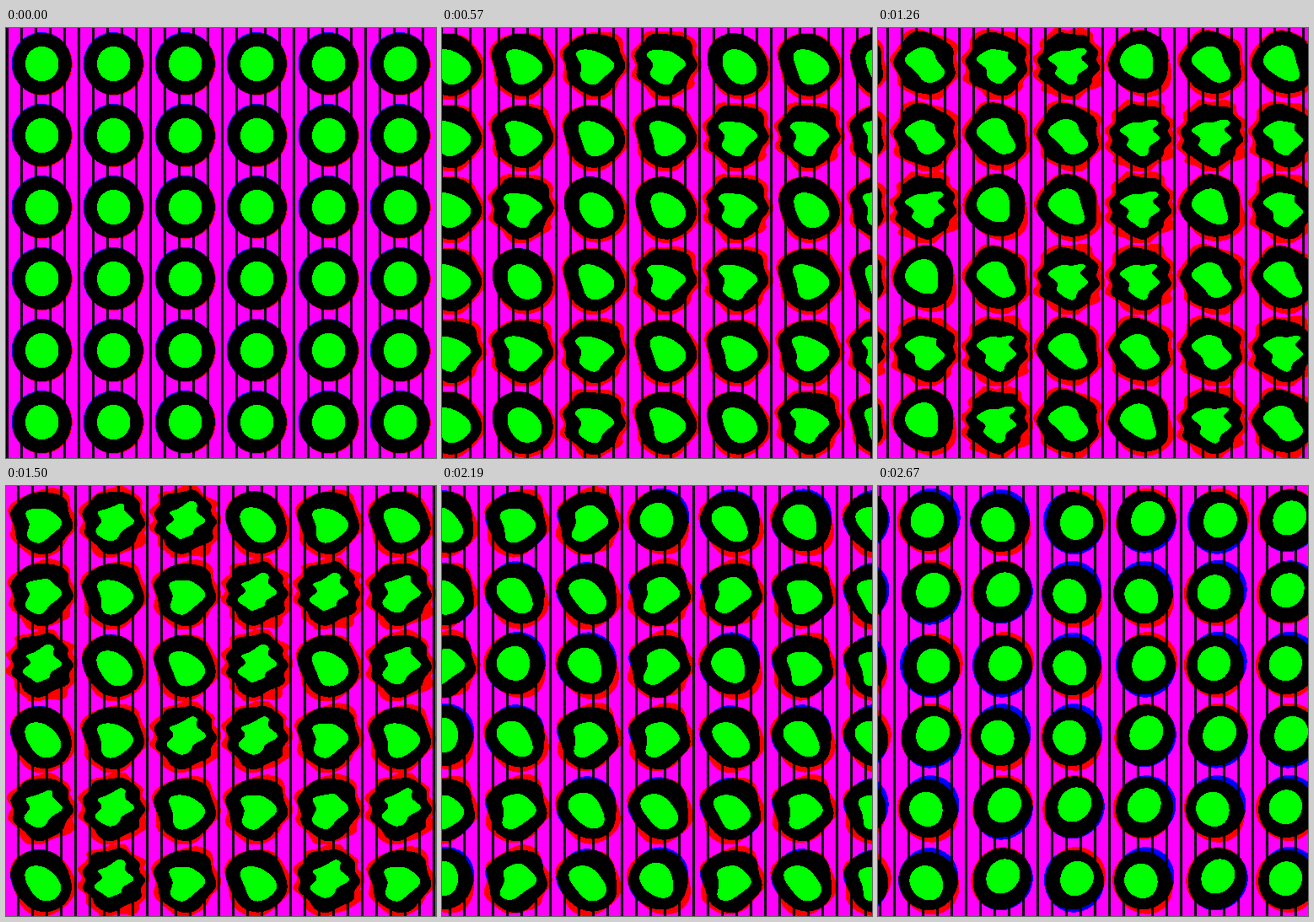
Write an HTML page with a canvas that moves like this. It is 510 by 510 pixels and loops after 2700 ms.

```html
<!DOCTYPE html>
<html>
<head>
<meta charset="utf-8">
<style>
  html, body { margin: 0; width: 510px; height: 510px; overflow: hidden; background: #f0f; }
  canvas { display: block; }
</style>
</head>
<body>
<canvas id="stage" width="510" height="510"></canvas>
<script>
const SIZE = 510, CELL = 85, STRIPE = 17, STEPS = 90, STEP_MS = 30, SCROLL = 1.7;
const BLACK = 0xff000000, RED = 0xff, GREEN = 0xff00, BLUE = 0xff0000;

// How strongly each cell is warped, by row and column
const strengths = ['45792435', '56459976', '59239377', '52488544', '87845687', '42953857'];

const ctx = document.getElementById('stage').getContext('2d');
const image = ctx.createImageData(SIZE, SIZE);
const pixels = new Uint32Array(image.data.buffer);

// True when the warped point lies in a disc: slow waves along x, fast ones along y
function inDisc(x, y, radius, amp, freq, phase) {
  const wx = 1.04 * (x + amp * Math.sin(freq * y + phase));
  const wy = y + amp * Math.sin(0.5 * freq * x + phase * 1.1);
  return wx * wx + wy * wy < radius * radius;
}

function drawCell(left, top, strength, t) {
  const env = Math.sin(Math.PI * t ** 0.85);
  const freq = 0.03 * t + 0.3 * strength * env;
  const phase = (16 + 5 * strength) * t;
  const blueRadius = 37 + env * (1.5 + 5 * strength);
  const sway = 2.6 * (1 - Math.cos(18.2 * t));
  const startX = Math.max(0, Math.ceil(left));
  const endX = Math.min(SIZE, Math.ceil(left + CELL));

  for (let py = top; py < top + CELL; py++) {
    const y = py - top - 42;
    for (let px = startX; px < endX; px++) {
      const local = px - left, x = local - 42.2;
      const d = x * x + y * y;
      let color = BLACK;
      if ((local + sway) % STRIPE >= 3) color |= RED | BLUE;
      if (d < 576 || inDisc(x + 0.4, y + 0.4, 37, 2.2, freq, phase * 0.94)) color &= ~RED;
      if (d < 576 || inDisc(x - 0.4, y - 0.4, blueRadius, 3.2, freq, phase * 1.03)) color &= ~BLUE;
      if (d < 1024 && inDisc(x, y, 20.5, 4.6, freq, phase)) color |= GREEN;
      pixels[py * SIZE + px] = color;
    }
  }
}

function draw(step) {
  strengths.forEach((row, r) => [...row].forEach((digit, c) =>
    drawCell(c * CELL - step * SCROLL, r * CELL, digit / 9, step / STEPS)));
  ctx.putImageData(image, 0, 0);
}

let shown = -1;
function tick() {
  const step = Math.floor(performance.now() / STEP_MS) % STEPS;
  if (step !== shown) draw(shown = step);
  requestAnimationFrame(tick);
}
tick();
</script>
</body>
</html>
```
